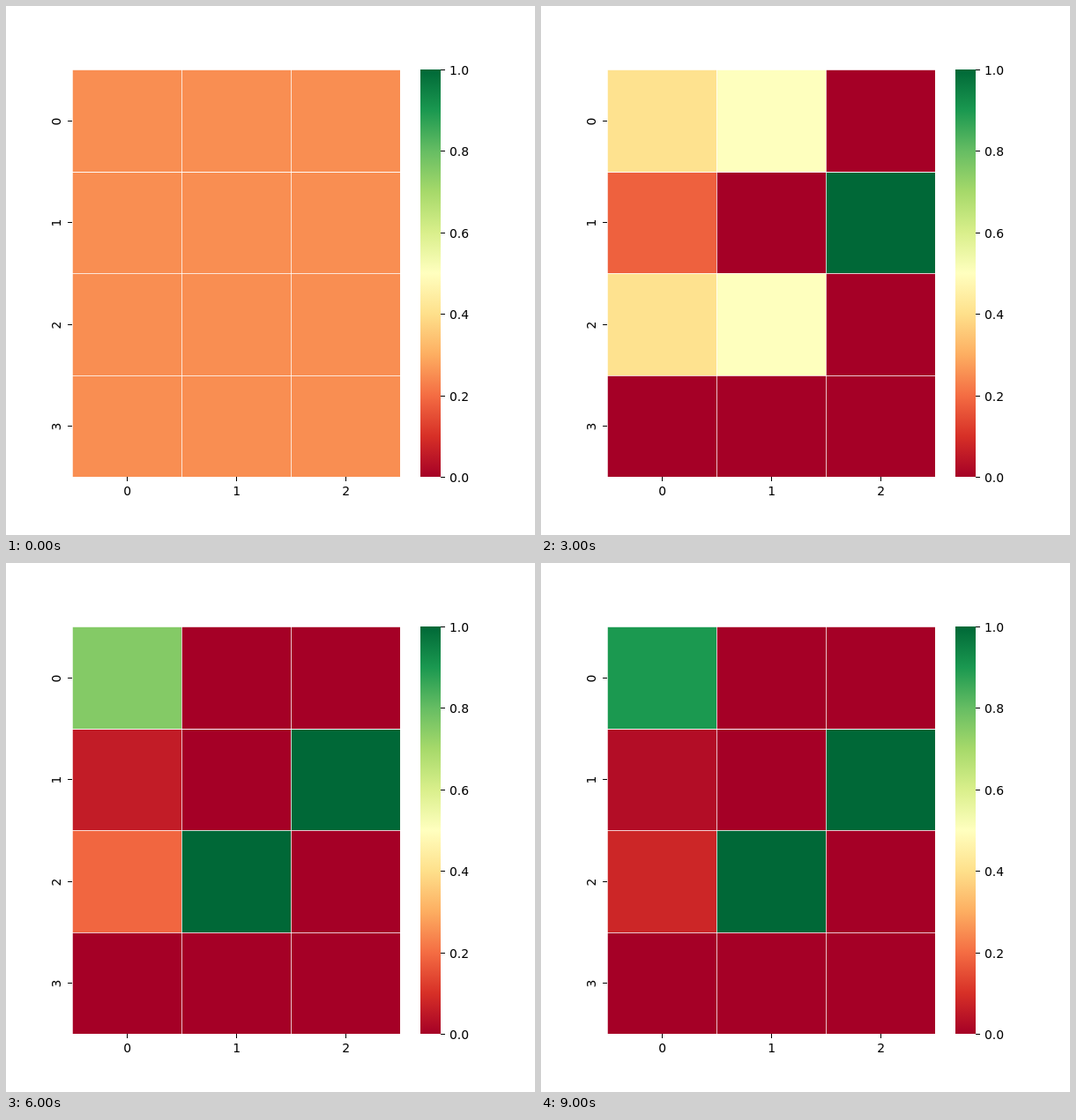
Animation of 600 by 600 pixels, one loop 10000 ms. Source, as an HTML page:

```html
<!DOCTYPE html>
<html lang="en">
<head>
<meta charset="utf-8">
<title>Heatmap</title>
<style>
  html, body { margin: 0; width: 100%; height: 100%; overflow: hidden; background: #fff; }
  svg { display: block; width: 600px; height: 600px; }
  text { font: 13.889px "DejaVu Sans", sans-serif; fill: #000; }
  .mid { text-anchor: middle; }
</style>
</head>
<body>
<svg id="chart" viewBox="0 0 600 600"></svg>
<script>
const STEP = 1000;
const LEFT = 75, TOP = 72, WIDTH = 372, HEIGHT = 462, COLS = 3, ROWS = 4;
const BAR_X = 470, BAR_W = 23;
const RAMP = ['#a50026', '#d73027', '#f46d43', '#fdae61', '#fee08b', '#ffffbf',
  '#d9ef8b', '#a6d96a', '#66bd63', '#1a9850', '#006837'];

// Each column holds one probability distribution over the four rows.
const even = [.25, .25, .25, .25];
const lean = [.4, .2, .2, .2];
const pairs = [.357, .143, .357, .143];
const split = [.5, 0, .5, 0];
const only = row => even.map((_, i) => +(i === row));
const first = (a, b, c) => [[a, b, c, 0], only(2), only(1)];

const states = [
  [even, even, even],
  [lean, lean, [0, 1 / 3, 1 / 3, 1 / 3]],
  [pairs, pairs, [0, .5, 0, .5]],
  [[.41, .18, .41, 0], split, only(1)],
  [[.43, .14, .43, 0], split, only(1)],
  first(.63, .08, .29),
  first(.75, .06, .19),
  first(.835, .045, .12),
  first(.87, .035, .095),
  first(.895, .03, .08)
];

const channels = RAMP.map(hex => [1, 3, 5].map(i => parseInt(hex.slice(i, i + 2), 16)));

function color(value) {
  const pos = Math.min(255, Math.floor(value * 256)) / 255 * 10;
  const i = Math.min(9, Math.floor(pos));
  const mix = channels[i].map((c, k) => Math.round(c + (channels[i + 1][k] - c) * (pos - i)));
  return `rgb(${mix})`;
}

const svg = document.getElementById('chart');

function add(name, attrs, parent = svg) {
  const node = document.createElementNS('http://www.w3.org/2000/svg', name);
  for (const key in attrs) node.setAttribute(key, attrs[key]);
  return parent.appendChild(node);
}
const rect = (x, y, width, height, fill, opacity = 1) =>
  add('rect', { x, y, width, height, fill, 'fill-opacity': opacity });
const label = (text, attrs) => { add('text', attrs).textContent = text; };

const colX = i => LEFT + i * WIDTH / COLS;
const rowY = i => Math.round(TOP + i * HEIGHT / ROWS);

const cells = [];
for (let c = 0; c < COLS; c++) {
  cells.push([]);
  for (let r = 0; r < ROWS; r++) {
    cells[c].push(rect(colX(c), rowY(r), WIDTH / COLS, rowY(r + 1) - rowY(r), '#fff'));
  }
}
for (let c = 0; c < COLS; c++) rect(colX(c), TOP, 1, HEIGHT, '#fff', .75);
for (let r = 0; r < ROWS; r++) rect(LEFT, rowY(r), WIDTH, 1, '#fff', r === 1 ? .95 : .78);

for (let c = 0; c < COLS; c++) {
  const x = colX(c + .5);
  rect(x, TOP + HEIGHT, 1, 5, '#000');
  label(c, { x: x + .6, y: 555, class: 'mid' });
}
for (let r = 0; r < ROWS; r++) {
  const y = rowY(r + .5);
  rect(70, y, 5, 1, '#000');
  label(r, { transform: `translate(62 ${y + 1}) rotate(-90)`, class: 'mid' });
}

const ramp = add('linearGradient', { id: 'ramp', x1: 0, y1: 1, x2: 0, y2: 0 });
RAMP.forEach((c, i) => add('stop', { offset: i / 10, 'stop-color': c }, ramp));
rect(BAR_X, TOP, BAR_W, HEIGHT, 'url(#ramp)');
for (let i = 0; i <= 5; i++) {
  const y = Math.round(TOP + HEIGHT * (1 - i / 5));
  rect(BAR_X + BAR_W, y, 5, 1, '#000');
  label((i / 5).toFixed(1), { x: 503, y: y + 6 });
}

let shown = -1;
function draw(now) {
  const step = Math.floor(now / STEP) % states.length;
  if (step !== shown) {
    shown = step;
    cells.forEach((col, c) => col.forEach((cell, r) =>
      cell.setAttribute('fill', color(states[step][c][r]))));
  }
}

const start = performance.now();
function tick() {
  draw(performance.now() - start);
  requestAnimationFrame(tick);
}
tick();
</script>
</body>
</html>
```
